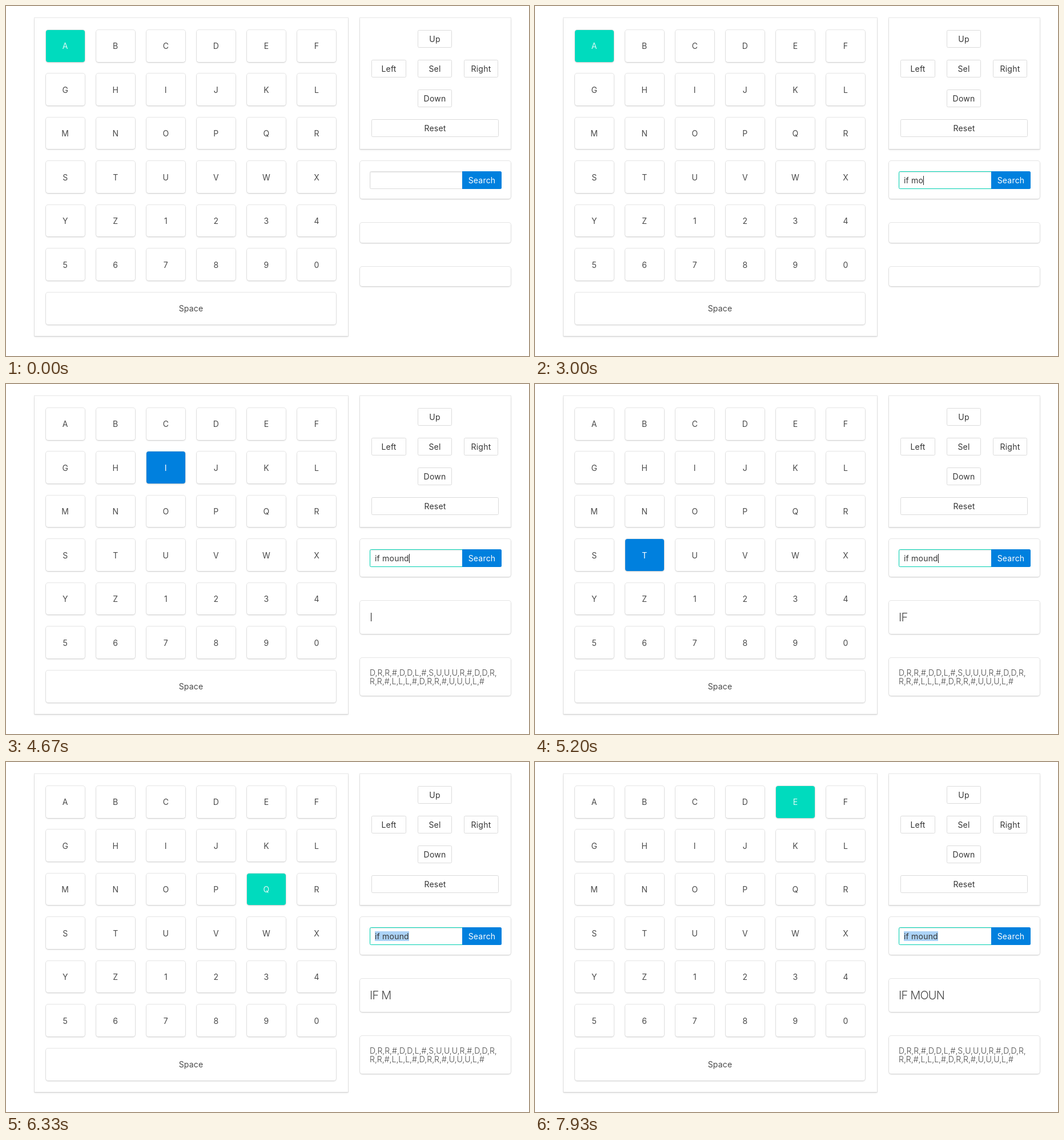
Animation of 916 by 612 pixels, one loop 8000 ms. Source, as an HTML page:

```html
<!DOCTYPE html>
<html lang="en">
<head>
<meta charset="utf-8">
<title>Keyboard path</title>
<style>
html, body { margin: 0; width: 100%; height: 100%; overflow: hidden; background: #fff; }
body { position: relative; font: 14px Inter, "Open Sans", sans-serif; color: #4a4a4a; }
div { position: absolute; box-sizing: border-box; white-space: pre; }
.card { box-shadow: 0 1.5px 2.5px rgba(10,10,10,.1), 0 0 0 1px rgba(10,10,10,.1); border-radius: 4px; }
.square { border-radius: 0; }
.key, .button, .search { display: flex; align-items: center; justify-content: center; letter-spacing: .2px; }
.button { border: 1px solid #dbdbdb; border-radius: 2.5px; color: #363636; }
.search { background: #0080de; color: #fff; border-radius: 0 2.5px 2.5px 0; }
.input { border: 1px solid #dbdbdb; border-radius: 2.5px 0 0 2.5px; box-shadow: inset 0 1px 2px rgba(10,10,10,.1);
  display: flex; align-items: center; padding-left: 8px; color: #363636; letter-spacing: .2px; }
.input.focus { border-color: #00d1b2; }
.input span { line-height: 17px; }
.input.selected span { background: #acd3f7; }
.input i { width: 1px; height: 16px; background: #222; visibility: hidden; }
.input.caret i { visibility: visible; }
.current, .picked { color: rgba(255,255,255,.85); background: #00dbbe; }
.picked { color: #fff; background: #0080de; }
.result { padding-left: 17px; font-size: 20px; font-weight: 300; letter-spacing: -.8px; line-height: 59px; }
.path { padding: 17.5px 0 0 17px; font-weight: 300; line-height: 15.6px; }
</style>
</head>
<body>
<script>
const QUERY = "if mound";
const MOVES = "DRR#DDL#SUUUR#DDRRR#LLL#DRR#UUUL#";
const TYPED_AT = [2060, 2190, 2460, 2660, 2990, 3130, 3330, 3530];
const FOCUS = 1460, SUBMIT = 4195, FIRST_MOVE = 4310, MOVE_TIME = 118.5;
const CARET_OFF = 5930, SELECT_ALL = 6195;
const LOOP = 8000, FPS = 15;

function box(type, x, y, w, h, text = "") {
  const el = document.createElement("div");
  el.className = type;
  el.style.cssText = `left:${x}px;top:${y}px;width:${w}px;height:${h}px`;
  el.textContent = text;
  return document.body.appendChild(el);
}

box("card square", 50, 21, 549, 556);
const keys = [..."ABCDEFGHIJKLMNOPQRSTUVWXYZ1234567890"].map((label, i) =>
  box("card key", 70 + (i % 6) * 88.05, 42 + Math.floor(i / 6) * 76.45, 67.5, 55.5, label));
const spaceKey = box("card key", 70, 501, 508, 55.5, "Space");

box("card square", 620, 21, 264, 229);
box("button", 721, 42, 60, 31, "Up");
box("button", 640, 94, 61, 31, "Left");
box("button", 721, 94, 60, 31, "Sel");
box("button", 802, 94, 60, 31, "Right");
box("button", 721, 146, 60, 31, "Down");
box("button", 640, 198, 223, 31, "Reset");

box("card", 620, 271, 264, 66);
const input = box("input", 637, 289, 163, 31);
const typed = input.appendChild(document.createElement("span"));
input.appendChild(document.createElement("i"));
box("search", 799, 289, 69, 31, "Search");

const result = box("card result", 620, 379, 264, 35);
const path = box("card path", 620, 456, 264, 34);
const pathText = [...MOVES].join(",").replace(/^.{34}/, "$&\n");

// Cursor, pressed key and number of letters entered after the first `count` moves
function walk(count) {
  let at = 0, entered = 0, last = "";
  for (last of MOVES.slice(0, count)) {
    at += { U: -6, D: 6, L: -1, R: 1 }[last] || 0;
    if (last === "#" || last === "S") entered++;
  }
  return { key: last === "S" ? spaceKey : keys[at], pressed: last === "#" || last === "S", entered };
}

function render(t) {
  typed.textContent = QUERY.slice(0, TYPED_AT.filter(start => t >= start).length);
  input.classList.toggle("focus", t >= FOCUS);
  input.classList.toggle("caret", t >= FOCUS && t < CARET_OFF);
  input.classList.toggle("selected", t >= SELECT_ALL);

  const { key, pressed, entered } = walk(Math.max(0, Math.floor((t - FIRST_MOVE) / MOVE_TIME) + 1));
  for (const k of [...keys, spaceKey]) {
    k.classList.toggle("current", k === key && !pressed);
    k.classList.toggle("picked", k === key && pressed);
  }

  result.textContent = QUERY.slice(0, entered).toUpperCase();
  result.style.height = (entered ? 58 : 35) + "px";
  path.textContent = t >= SUBMIT ? pathText : "";
  path.style.top = (entered ? 479 : 456) + "px";
  path.style.height = (t >= SUBMIT ? 66 : 34) + "px";
}

function tick() {
  const t = performance.now() % LOOP;
  render(Math.floor((t + 4) * FPS / 1000) * 1000 / FPS);
  requestAnimationFrame(tick);
}
tick();
</script>
</body>
</html>
```
